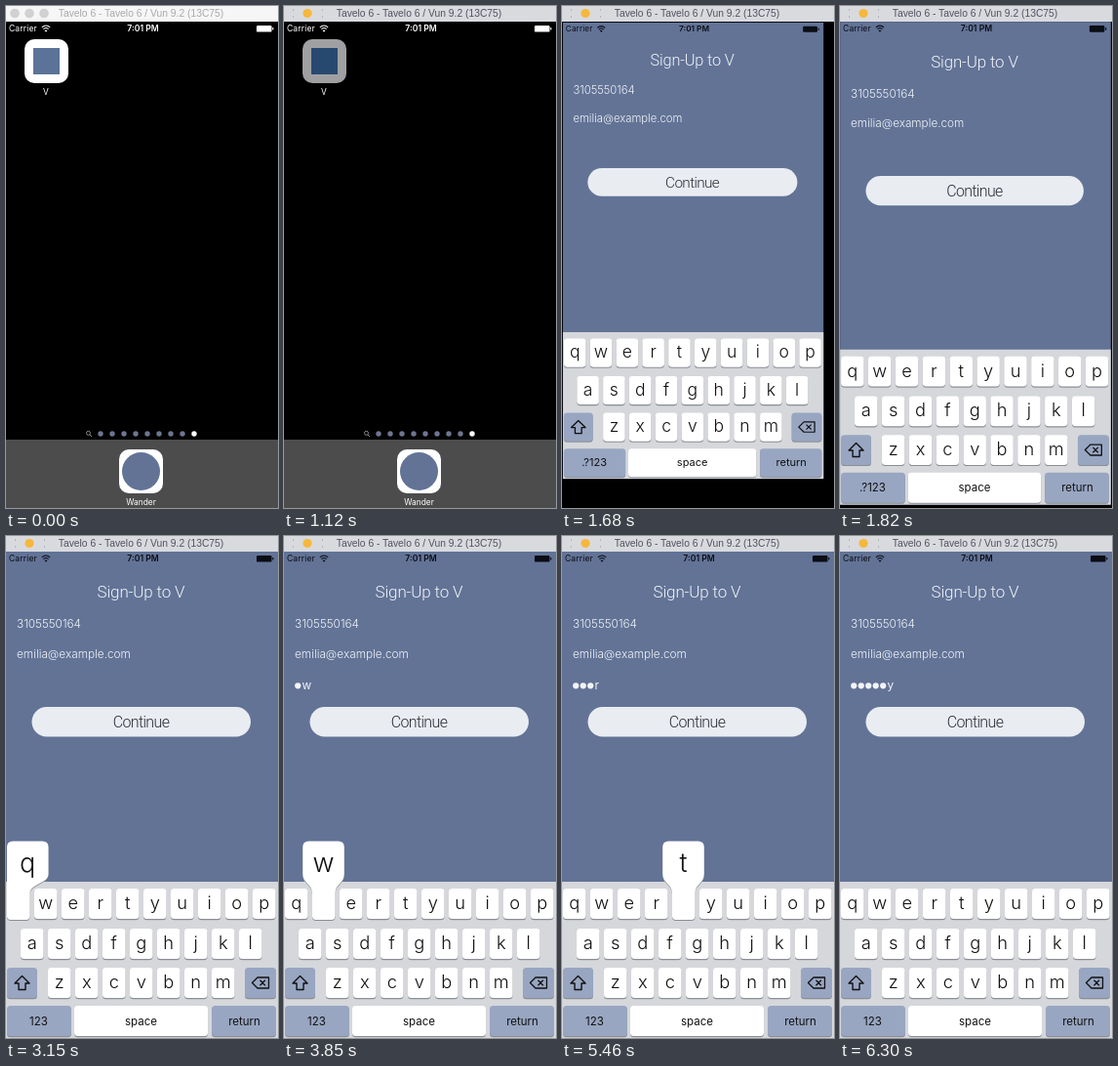
An HTML page for the animation above (8000 ms loop, 279 by 514 pixels).

```html
<!DOCTYPE html>
<html lang="en">
<head>
<meta charset="utf-8">
<title>Sign-up demo</title>
<style>
  html, body { margin: 0; width: 100%; height: 100%; overflow: hidden; background: #000; }
  svg { display: block; width: 100vw; height: 100vh; }
  text { font-family: Inter, Roboto, sans-serif; white-space: pre; }
  .bar { font-family: "Liberation Sans", Arial, sans-serif; }
  .thin { font-family: Roboto, Lato, sans-serif; font-weight: 300; }
</style>
</head>
<body>
<svg id="stage" viewBox="0 0 279 514" preserveAspectRatio="none"></svg>
<script>
const LOOP = 8000, STEP = 70;
const BLUE = '#627396', KEY_BLUE = '#98a6c2';
const ICON = { x: 19, y: 34, size: 45 };
const SCREEN = { y: 16, w: 279, h: 498 };

// Key presses: popup shown, character entered, popup hidden (ms)
const PRESSES = [
  ['q', 3150, 3220, 3360],
  ['w', 3710, 3850, 3920],
  ['e', 4340, 4480, 4550],
  ['r', 4900, 5040, 5110],
  ['t', 5460, 5600, 5670],
  ['y', 6090, 6230, 6300]
];

const rect = (x, y, w, h, r, fill, extra = '') =>
  `<rect x="${x}" y="${y}" width="${w}" height="${h}" rx="${r}" fill="${fill}" ${extra}/>`;
const circle = (x, y, r, fill, extra = '') =>
  `<circle cx="${x}" cy="${y}" r="${r}" fill="${fill}" ${extra}/>`;
const label = (x, y, size, str, fill, extra = '') =>
  `<text x="${x}" y="${y}" font-size="${size}" fill="${fill}" ${extra}>${str}</text>`;
const MID = 'text-anchor="middle"';
const stroke = (d, color, width) =>
  `<path d="${d}" fill="none" stroke="${color}" stroke-width="${width}" stroke-linejoin="round"/>`;

function statusBar(color) {
  return label(3, 26, 8.5, 'Carrier', color, 'letter-spacing=".15"')
    + stroke('M36.8 21.8Q41 18.2 45.2 21.8M38.4 23.6Q41 21.4 43.6 23.6', color, 1.1)
    + `<path d="M39.5 25Q41 23.8 42.5 25L41 26.7Z" fill="${color}"/>`
    + label(140.5, 26, 8.6, '7:01 PM', color, MID + ' font-weight="600"')
    + rect(257, 20, 15.5, 6.6, 1.2, color)
    + rect(273.2, 22, 1.2, 2.6, 0.5, color);
}

function titleBar(active) {
  const text = label(138.5, 11.3, 10.3, 'Tavelo 6 - Tavelo 6 / Vun 9.2 (13C75)',
    active ? '#50525f' : '#a9a9ab', MID + ' class="bar"');
  const dots = active
    ? circle(24, 7.5, 4.6, '#f5b83d')
      + stroke('M9.5 3v2m0 5v2M39.5 3v2m0 5v2', '#b4b5bb', 1)
    : [9, 24, 39].map(x => circle(x, 7.5, 4.8, '#d1d1d2')).join('');
  return rect(0, 0, 279, 16, 0, active ? '#d9dade' : '#f6f6f6') + dots + text;
}

function homeScreen() {
  const dots = Array.from({ length: 9 }, (_, i) =>
    circle(97 + 12 * i, 438, 2.7, i < 8 ? '#6c7691' : '#fff')).join('');
  return rect(0, 444, 279, 70, 0, '#4c4c4c')
    + rect(116, 454, 45, 45, 10, '#fff')
    + circle(138.5, 476.5, 19.5, BLUE)
    + label(138.5, 510.5, 8.4, 'Wander', '#fff', MID)
    + circle(84.5, 437.3, 2, 'none', 'stroke="#8b8b8b"')
    + stroke('M86 439l2 2', '#8b8b8b', 1)
    + dots
    + rect(ICON.x, ICON.y, 45, 45, 10, '#fff', 'id="tile"')
    + rect(28, 43, 27, 27, 0, '#5c7399', 'id="mark"')
    + label(41, 90.5, 8.4, 'V', '#fff', MID);
}

function key(x, y, w, fill = '#fff') {
  return rect(x, y + 1, w, 31.2, 3.5, '#8b8e94') + rect(x, y, w, 31, 3.5, fill);
}

function letterRow(letters, x0, y) {
  return [...letters].map((c, i) => key(x0 + 28 * i, y, 23.5)
    + label(x0 + 11.75 + 28 * i, y + 21, 18.3, c, '#111', MID + ' font-weight="300"')).join('');
}

function keyboard() {
  const word = (x, str, id = '') => label(x, 500.5, 11.5, str, '#111', MID + id);
  return rect(0, 354, 279, 160, 0, '#d5d7db')
    + letterRow('qwertyuiop', 1, 361)
    + letterRow('asdfghjkl', 15, 402)
    + letterRow('zxcvbnm', 43, 442)
    + key(1, 442, 31, KEY_BLUE)
    + stroke('M16.5 450.5L24 458H20V464.5H13V458H9Z', '#111', 1.4)
    + key(245, 442, 32, KEY_BLUE)
    + stroke('M252.5 457.5L258 452H269.5V463H258ZM260.5 454.8l5.4 5.4m0-5.4l-5.4 5.4', '#111', 1.3)
    + key(1, 481, 66, KEY_BLUE) + word(33.5, '.?123', ' id="mode"')
    + key(70, 481, 137) + word(138.5, 'space')
    + key(211, 481, 66, KEY_BLUE) + word(244.5, 'return');
}

function appScreen() {
  return rect(0, 16, 279, 498, 0, BLUE)
    + statusBar('#0b0d14')
    + label(138.5, 63, 17, 'Sign-Up to V', '#f2f4f8', MID + ' class="thin" letter-spacing="-.15"')
    + label(11, 94, 11.8, '3105550164', '#f2f4f8', 'font-weight="300"')
    + label(11, 125, 11.8, 'emilia@example.com', '#f2f4f8', 'font-weight="300"')
    + '<g id="password"></g>'
    + rect(26.5, 175, 224.5, 30.5, 15.2, '#e9edf2')
    + label(138.5, 195.8, 16, 'Continue', '#2c2f36', MID + ' class="thin" letter-spacing="-.65"')
    + keyboard()
    + '<g id="popup"></g>';
}

function popup(index, char) {
  const k0 = 1 + 28 * index, k1 = k0 + 23.5, mid = (k0 + k1) / 2;
  const h0 = Math.max(1, mid - 21.5), h1 = h0 + 42.5;
  const d = `M${h0 + 6} 312.5H${h1 - 6}Q${h1} 312.5 ${h1} 318.5V346`
    + `C${h1} 356 ${k1} 356 ${k1} 366V389Q${k1} 393 ${k1 - 4} 393H${k0 + 4}Q${k0} 393 ${k0} 389V366`
    + `C${k0} 356 ${h0} 356 ${h0} 346V318.5Q${h0} 312.5 ${h0 + 6} 312.5Z`;
  return `<path d="${d}" fill="#8b8e94" transform="translate(0 1)"/><path d="${d}" fill="#fff"/>`
    + label((h0 + h1) / 2, 344, 27, char, '#111', MID + ' font-weight="300"');
}

function password(t) {
  const typed = PRESSES.filter(p => t >= p[2]);
  return typed.map(([c], i) => i < typed.length - 1
    ? circle(14.2 + 7.5 * i, 153.3, 3.1, '#f2f4f8')
    : label(11 + 7.5 * i, 157, 11.8, c, '#f2f4f8')).join('');
}

const stage = document.getElementById('stage');
stage.innerHTML = rect(0, 0, 279, 514, 0, '#000')
  + `<g id="home">${homeScreen()}</g><g id="status">${statusBar('#fff')}</g>`
  + `<g id="app">${appScreen()}</g><g id="title"></g>`;
const el = {};
stage.querySelectorAll('[id]').forEach(n => el[n.id] = n);

const mix = (a, b, p) => a + (b - a) * p;

// Damped rise of the opening zoom
function zoom(t) {
  if (t >= 2100) return 1;
  const x = Math.max(0, t - 1370) * 0.0203;
  return 1 - (1 + x + x * x / 2) * Math.exp(-x);
}

function draw(t) {
  const p = zoom(t), tall = Math.pow(p, 1.37);
  const x = mix(ICON.x, 0, p), y = mix(ICON.y, SCREEN.y, p);
  const w = mix(ICON.size, SCREEN.w, p), h = mix(ICON.size, SCREEN.h, tall);
  const s = w / ICON.size, fade = Math.max(0, 1 - 1.1 * p);

  el.home.setAttribute('transform',
    `translate(${x} ${y}) scale(${s}) translate(${-ICON.x} ${-ICON.y})`);
  el.home.setAttribute('opacity', fade);
  el.status.setAttribute('opacity', fade);
  el.app.setAttribute('transform',
    `translate(${x} ${y}) scale(${w / SCREEN.w} ${h / SCREEN.h}) translate(0 ${-SCREEN.y})`);
  el.app.setAttribute('opacity', Math.min(1, p * 4));

  const pressed = t >= 1120 && t < 1330;
  el.tile.setAttribute('fill', pressed ? '#a0a0a3' : '#fff');
  el.mark.setAttribute('fill', pressed ? '#28496f' : '#5c7399');
  el.title.innerHTML = titleBar(t >= 1120);
  el.mode.textContent = t < 2170 ? '.?123' : '123';
  el.password.innerHTML = password(t);
  const i = PRESSES.findIndex(k => t >= k[1] && t < k[3]);
  el.popup.innerHTML = i < 0 ? '' : popup(i, PRESSES[i][0]);
}

const start = performance.now();
let last = -1;
function tick() {
  const t = Math.floor((performance.now() - start) % LOOP / STEP) * STEP;
  if (t !== last) draw(last = t);
  requestAnimationFrame(tick);
}
tick();
</script>
</body>
</html>
```
